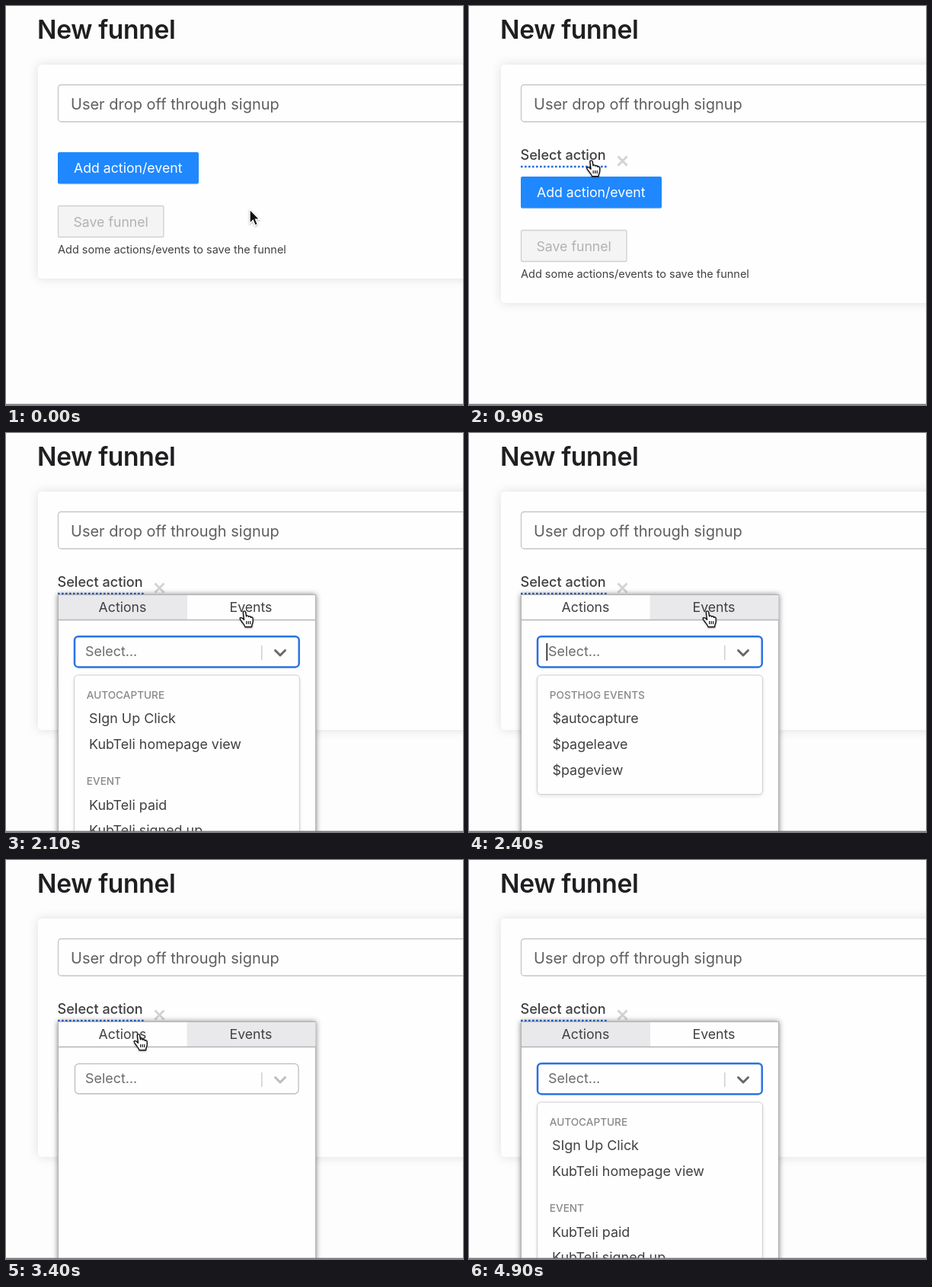
An HTML page for the animation above (5000 ms loop, 600 px wide and 524 px high).

```html
<!DOCTYPE html>
<html lang="en">
<head>
<meta charset="utf-8">
<title>New funnel</title>
<style>
  html, body { margin: 0; width: 100%; height: 100%; overflow: hidden; background: #fefdfe; }
  svg { display: block; width: 600px; height: 524px; }
  text { font: 17.7px Inter, Roboto, sans-serif; fill: #404043; white-space: pre; }
  .title { font-size: 33.6px; font-weight: 600; letter-spacing: -.01em; fill: #1f1f21; }
  .field { font-size: 20px; fill: #5f5f62; }
  .note { font-size: 14.5px; }
  .strong { font-size: 18.1px; font-weight: 500; }
  .heading { font-size: 13.6px; font-weight: 500; fill: #88888c; }
  .option { font-size: 17.9px; }
  .middle { text-anchor: middle; }
  .card { fill: #fefefe; filter: drop-shadow(0 0 7px rgba(0, 0, 0, .12)); }
  .popup { fill: #fefefe; stroke: #b2b2b5; filter: drop-shadow(0 0 3.5px rgba(0, 0, 0, .5)); }
  .menu { fill: #fefefe; stroke: #cfcfd2; filter: drop-shadow(0 2px 2px rgba(0, 0, 0, .1)); }
  .hidden { display: none; }
</style>
</head>
<body>
<svg viewBox="0 0 600 524">
  <rect width="600" height="524" fill="#fefdfe"/>
  <text class="title" x="41" y="43">New funnel</text>
  <rect id="card" class="card" x="42" y="77" width="580" height="281" rx="5"/>

  <rect id="ring" x="66" y="101" width="560" height="53" rx="6" fill="none" stroke="#bcdafc" stroke-width="5"/>
  <rect id="field" x="68.5" y="103.5" width="560" height="48.5" rx="4" fill="#fefefe" stroke="#c3c5c9" stroke-width="1.3"/>
  <text class="field" x="85" y="135.5">User drop off through signup</text>

  <g id="buttons">
    <rect x="68" y="193" width="185" height="42" rx="2" fill="#000" opacity=".06"/>
    <rect id="add" x="68" y="192" width="185" height="41.5" rx="2"/>
    <text x="89" y="219" style="fill:#fff">Add action/event</text>
    <rect x="68.5" y="262.5" width="138.5" height="41" rx="2" fill="#f4f4f5" stroke="#d0d0d3" stroke-width="1.3"/>
    <text x="88.5" y="289.5" style="fill:#b2b2b5">Save funnel</text>
    <text class="note" x="68" y="325">Add some actions/events to save the funnel</text>
  </g>

  <g id="step">
    <text class="strong" x="67.5" y="202">Select action</text>
    <path d="M68 211H181" stroke="#1d6be0" stroke-width="2.6" stroke-dasharray="2.6 2.4"/>
    <path d="M195.500 197.500l12 12m0-12l-12 12" stroke="#d3d3d6" stroke-width="3"/>
  </g>

  <g id="popup">
    <rect class="popup" x="68.5" y="212.5" width="338" height="330"/>
    <rect id="tab" y="213" width="169" height="32" fill="#e9e8ea"/>
    <path d="M69 245.500H406" stroke="#b4b4b7" stroke-width="1.3"/>
    <text class="middle" x="153" y="235">Actions</text>
    <text class="middle" x="321.5" y="235">Events</text>

    <rect id="select" fill="#fefefe" rx="5"/>
    <text class="option" x="104" y="293" style="fill:#6c6c6f">Select...</text>
    <path d="M335.800 279V298" stroke="#c8c8cb" stroke-width="1.3"/>
    <path id="chevron" d="M353.500 285.500l6.500 6.500 6.500-6.500" fill="none" stroke-width="3" stroke-linecap="round" stroke-linejoin="round"/>
    <path id="caret" d="M102.300 276V299" stroke="#111" stroke-width="1.5"/>

    <g id="actionsMenu">
      <rect class="menu" x="89.5" y="318" width="296" height="260" rx="5"/>
      <text class="heading" x="105.8" y="349">AUTOCAPTURE</text>
      <text class="option" x="109" y="381">SIgn Up Click</text>
      <text class="option" x="109" y="415">KubTeli homepage view</text>
      <text class="heading" x="105.8" y="461.5">EVENT</text>
      <text class="option" x="109" y="494.5">KubTeli paid</text>
      <text class="option" x="109" y="528">KubTeli signed up</text>
    </g>
    <g id="eventsMenu">
      <rect class="menu" x="89.5" y="318" width="296" height="156.5" rx="5"/>
      <text class="heading" x="105.8" y="349">POSTHOG EVENTS</text>
      <text class="option" x="109.5" y="381">$autocapture</text>
      <text class="option" x="109.5" y="415">$pageleave</text>
      <text class="option" x="109.5" y="448.5">$pageview</text>
    </g>
  </g>

  <rect y="522.6" width="600" height="1.4" fill="#77777a"/>

  <g id="cursor" style="filter:drop-shadow(0 1px 1px rgba(0,0,0,.3))">
    <path id="arrow" d="M0 0V18.500L4.300 14.500 7.100 21.200 10.400 19.800 7.600 13.300H13Z" fill="#111" stroke="#fff" stroke-width="1.4"/>
    <g id="hand" transform="translate(-7.7 .4)" stroke="#111" stroke-width="1.4" stroke-linejoin="round">
      <path fill="#fff" d="M5 1.800C5 0 8 0 8.300 1.800L9.200 7.300C9.600 6 12 6.200 12.300 7.900 12.700 6.800 14.900 7.200 15.200 8.900 15.800 8 17.900 8.400 17.900 10.300V14C17.900 17 16.300 18 16.300 21.300H7.700C7.200 18.600 4 15.700 2.800 13.700 1.200 11.500.2 10.300 1 9.500 2.100 8.600 4.100 9.700 6.200 11.800Z"/>
      <path stroke-width="1.2" d="M9.400 13.500v4.200M11.900 13.500v4.200M14.400 13.500v4.200"/>
    </g>
  </g>
</svg>
<script>
const LOOP = 5000, STEP = 100, BLINK = 275;
const el = id => document.getElementById(id);
const show = (id, on) => el(id).classList.toggle('hidden', !on);
const set = (id, attrs) => Object.entries(attrs).forEach(([k, v]) => el(id).setAttribute(k, v));
const within = (t, from, to) => t >= from && t < to;

// time, x, y of the pointer tip
const route = [
  [0, 320, 267], [300, 230, 128], [400, 230, 128], [600, 181, 209], [800, 181, 209],
  [1000, 142, 195], [1400, 142, 195], [1800, 366, 285], [2000, 318, 238], [2100, 314, 233],
  [2900, 314, 233], [3300, 175, 228], [4000, 175, 228], [4100, 190, 300], [4200, 250, 470],
  [4300, 72, 25]
];
// periods in which the dropdown has focus
const focusSpans = [[1200, 2300], [2400, 3300], [3500, LOOP]];

function pointerAt(t) {
  const next = route.findIndex(p => p[0] > t);
  if (next < 0) return route[route.length - 1].slice(1);
  const [t0, x0, y0] = route[next - 1], [t1, x1, y1] = route[next];
  const u = (t - t0) / (t1 - t0), ease = u * u * (3 - 2 * u);
  return [x0 + (x1 - x0) * ease, y0 + (y1 - y0) * ease];
}

function drawForm(t) {
  const added = t >= 800, fieldFocus = within(t, 300, 700);
  set('card', { height: added ? 313 : 281 });
  show('ring', fieldFocus);
  set('field', { stroke: fieldFocus ? '#6aaef5' : '#c3c5c9' });
  set('buttons', { transform: `translate(0 ${added ? 32 : 0})` });
  set('add', { fill: within(t, 600, 800) ? '#42a1fb' : '#1f88ff' });
  show('step', added);
}

function drawPopup(t) {
  const span = focusSpans.find(([from, to]) => within(t, from, to));
  const events = within(t, 2400, 3500);
  show('popup', t >= 1100);
  set('tab', { x: events ? 237.5 : 69 });
  set('select', span
    ? { x: 90, y: 267.2, width: 294.7, height: 40.2, stroke: '#2a72e4', 'stroke-width': 2.5 }
    : { x: 90.5, y: 267.7, width: 293.5, height: 39.3, stroke: '#bdbdc0', 'stroke-width': 1.3 });
  set('chevron', { stroke: span ? '#68686b' : '#bdbdc0' });
  show('caret', span && Math.floor((t - span[0]) / BLINK) % 2 === 0);
  show('actionsMenu', span && !events);
  show('eventsMenu', span && events);
}

function drawPointer(t) {
  const hand = within(t, 600, 1500) || within(t, 2000, 4100);
  show('cursor', t < 4400);
  show('hand', hand);
  show('arrow', !hand);
  set('cursor', { transform: `translate(${pointerAt(t)})` });
}

function draw(now) {
  const t = Math.floor(now % LOOP / STEP) * STEP;
  drawForm(t);
  drawPopup(t);
  drawPointer(t);
}

const start = performance.now();
function tick() {
  draw(performance.now() - start);
  requestAnimationFrame(tick);
}
tick();
</script>
</body>
</html>
```
